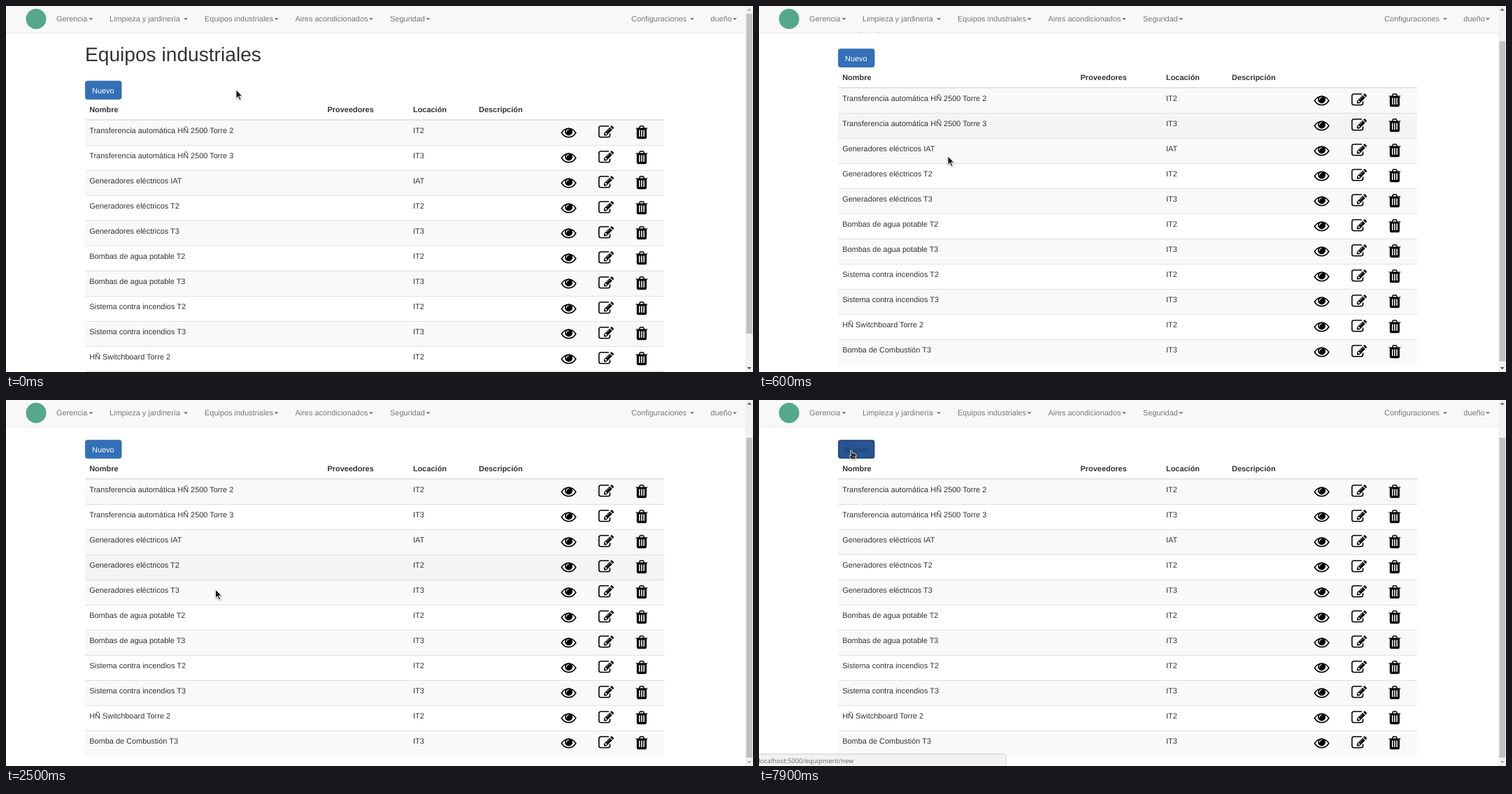
Animation, 1068 px wide and 524 px high, one loop 8000 ms. Source, as an HTML page:

```html
<!DOCTYPE html>
<html lang="es">
<head>
<meta charset="utf-8">
<title>Equipos industriales</title>
<style>
html, body { margin: 0; width: 100%; height: 100%; overflow: hidden; background: #fff; }
svg { display: block; width: 1068px; height: 524px; }
text { font: 10.95px "Liberation Sans", Arial, sans-serif; fill: #333; text-rendering: geometricPrecision; white-space: pre; }
h1, .title { font-size: 28.15px; }
.head { font-weight: bold; }
.nav text, .nav path { fill: #777; }
#status text { font: 9.38px "Open Sans", "Noto Sans", sans-serif; fill: #666; }
#button rect { fill: #3370b7; stroke: #2d67ab; }
#button text { fill: #fff; }
#button .focus { display: none; }
#button.pressed rect { fill: #285596; stroke: #1d3f70; }
#button.pressed text { fill: #22385c; }
#button.pressed .focus { display: inline; fill: none; stroke: #1c3860; stroke-dasharray: 1 1; }
.cursor { fill: #151515; stroke: #fff; stroke-width: .9; stroke-linejoin: round; filter: drop-shadow(.8px 1.2px .8px rgba(0,0,0,.35)); }
</style>
</head>
<body>
<svg viewBox="0 0 1068 524">
  <defs>
    <g id="eye">
      <path d="M64 960C230 690 540 448 896 448S1562 690 1728 960C1562 1230 1252 1472 896 1472S230 1230 64 960Z" fill="none" stroke="#000" stroke-width="128"/>
      <path fill-rule="evenodd" d="M448 832a448 448 0 0 1 896 0a448 448 0 0 1-896 0ZM592 832a48 48 0 0 0 96 0a208 208 0 0 1 208-208a48 48 0 0 0 0-96a304 304 0 0 0-304 304Z"/>
    </g>
    <g id="edit">
      <path d="M1210 210Q1165 192 1120 192H288a224 224 0 0 0-224 224v832a224 224 0 0 0 224 224h832a224 224 0 0 0 224-224V1050" fill="none" stroke="#000" stroke-width="128"/>
      <path fill-rule="evenodd" d="M1312 320l288 288-672 672H640V992ZM888 1184l116-116-152-152-116 116v56h96v96ZM1295 465L940 820q-10 40 37 27L1328 497q15-40-33-32Z"/>
      <path d="M1756 452l-92 92-288-288 92-92q68-56 136 0l152 152q56 68 0 136Z"/>
    </g>
    <g id="trash">
      <path d="M420 410L488 245Q512 192 560 192H848Q896 192 920 245L988 410" fill="none" stroke="#000" stroke-width="128"/>
      <rect y="384" width="1408" height="96" rx="32"/>
      <path fill-rule="evenodd" d="M128 440H1280V1460Q1270 1664 1120 1664H288Q138 1664 128 1460ZM384 640v768h128V640ZM640 640v768h128V640ZM896 640v768h128V640Z"/>
    </g>
  </defs>

  <g id="page">
    <text class="title" x="113" y="78.5">Equipos industriales</text>
    <g id="button">
      <rect x="113.4" y="107.4" width="51.6" height="26" rx="3" stroke-width=".8"/>
      <rect class="focus" x="114.5" y="108.5" width="49.4" height="23.8"/>
      <text x="123" y="124.6">Nuevo</text>
    </g>
    <g id="table"></g>
  </g>

  <g class="nav">
    <rect width="1057" height="38" fill="#f8f8f8"/>
    <rect y="38" width="1057" height=".8" fill="#e2e2e2"/>
    <circle cx="43" cy="18.5" r="14.5" fill="#55a88a"/>
    <g id="menu"></g>
  </g>

  <g id="scrollbar">
    <rect x="1057" width="11" height="524" fill="#f1f1f1"/>
    <rect id="thumb" x="1058.5" width="8.6" height="458" fill="#c1c1c1"/>
    <path id="up" d="M1059.7 6.6h6l-3-3.2Z"/>
    <path id="down" d="M1059.7 517h6l-3 3.2Z"/>
  </g>

  <g id="status">
    <path d="M-1 525V506.9H350.5q2.8 0 2.8 2.8V525Z" fill="#f2f2f2" stroke="#c6c6c6" stroke-width=".8"/>
    <text id="link" x="-.8" y="519.6"></text>
  </g>

  <path id="arrow" class="cursor" d="M0 0V12.3L2.8 9.7 5 14.6 7.1 13.7 4.9 8.9H8.8Z"/>
  <g id="hand" class="cursor">
    <path d="M1.5 1C1.5-.2 3.3-.3 3.6 1L4.4 4.5 5.9 4.2 7.6 4.7 9 5.2C9.9 5.7 10.1 7 9.8 9L9 12.6H3.6L.5 8.8C-.3 7.6 1.1 6.9 2.2 7.7L2.7 8.1Z"/>
    <path d="M5 7.6l.5 3M6.7 7.6l.3 3M8.3 7.6v3" stroke-width=".5"/>
  </g>
</svg>

<script>
const $ = id => document.getElementById(id);
const LOOP = 8000, STEP = 100, ROW_TOP = 163.4, ROW_H = 36;

const menu = [
  ['Gerencia', 72, 121.5], ['Limpieza y jardinería', 148, 257],
  ['Equipos industriales', 284, 386.5], ['Aires acondicionados', 413.5, 522],
  ['Seguridad', 549, 603.5], ['Configuraciones', 894, 981], ['dueño', 1007.3, 1042]
];
const heads = [['Nombre', 119.2], ['Proveedores', 459.5], ['Locación', 582], ['Descripción', 676]];
const items = [
  ['Transferencia automática HÑ 2500 Torre 2', 'IT2'],
  ['Transferencia automática HÑ 2500 Torre 3', 'IT3'],
  ['Generadores eléctricos IAT', 'IAT'],
  ['Generadores eléctricos T2', 'IT2'],
  ['Generadores eléctricos T3', 'IT3'],
  ['Bombas de agua potable T2', 'IT2'],
  ['Bombas de agua potable T3', 'IT3'],
  ['Sistema contra incendios T2', 'IT2'],
  ['Sistema contra incendios T3', 'IT3'],
  ['HÑ Switchboard Torre 2', 'IT2'],
  ['Bomba de Combustión T3', 'IT3']
];

const label = (s, x, y, cls = '') => `<text class="${cls}" x="${x}" y="${y}">${s}</text>`;
const line = (y, h) => `<rect x="113" y="${y}" width="828" height="${h}" fill="#ddd"/>`;
const icon = (id, x, y) => `<use href="#${id}" transform="translate(${x} ${y}) scale(.01228)"/>`;

$('menu').innerHTML = menu.map(([s, x, c]) =>
  label(s, x, 22) + `<path d="M${c - 3.1} 17.2h6.2l-3.1 3.1Z"/>`).join('');

$('table').innerHTML = heads.map(([s, x]) => label(s, x, 152, 'head')).join('') +
  items.map(([name, place], i) => {
    const y = ROW_TOP + i * ROW_H;
    return `<rect class="row" x="113" y="${y}" width="828" height="${ROW_H - .4}"/>` +
      (i ? line(y - .4, .9) : line(y - 1.2, 1.6)) +
      label(name, 119.2, y + 18.6) + label(place, 582, y + 18.6) +
      icon('eye', 793.5, y + 6.3) + icon('edit', 847, y + 6.3) + icon('trash', 900.2, y + 6.3);
  }).join('');
const rows = [...document.querySelectorAll('.row')];

// Pointer path: time, x, y
const path = [
  [100, 329, 120], [200, 322, 124], [300, 300, 145], [400, 272, 170], [500, 262, 178.5],
  [600, 270, 215], [700, 300, 290], [800, 340, 370], [900, 365, 422], [1000, 372, 434],
  [1100, 370, 385], [1200, 361, 310], [1300, 346, 235], [1400, 331, 175], [1500, 318, 138],
  [1700, 309, 122], [2000, 303, 130], [2200, 300, 166], [2400, 299, 240], [2500, 299.5, 271.3]
];
const scrolling = [[400, 0], [500, 26.5], [600, 46], [700, 50]];

// Later stops: time, x, y, hand cursor, hovered row, link
const base = 'localhost:5000/equipment/';
const stops = [
  [5500, 855, 126, true, 0, '3/edit'],
  [5800, 892.3, 155, false, 0, '3/edit'],
  [6300, 904.6, 126, true, 0, '3'],
  [6800, 834.5, 138, false, 0, '3'],
  [7500, 141.5, 96.5, false, -1, '3'],
  [7900, 129, 72, true, -1, 'new']
];

function sample(keys, t) {
  if (t <= keys[0][0]) return keys[0].slice(1);
  const i = keys.findIndex(k => k[0] >= t);
  if (i < 0) return keys[keys.length - 1].slice(1);
  const a = keys[i - 1], b = keys[i], p = (t - a[0]) / (b[0] - a[0]);
  return a.slice(1).map((v, j) => v + (b[j + 1] - v) * p);
}

// Hover trails the pointer by one step
function rowAt(t) {
  const [, y] = sample(path, t), [s] = sample(scrolling, t);
  return Math.floor((y + s - ROW_TOP) / ROW_H);
}

function state(t) {
  const stop = stops.filter(s => s[0] <= t).pop();
  if (stop) {
    const [, x, y, hand, hover, link] = stop;
    return { x, y, hand, hover, link };
  }
  const q = Math.min(Math.floor(t / STEP) * STEP, 2500);
  const [x, y] = sample(path, q);
  return { x, y, hand: false, hover: rowAt(q - STEP), link: '' };
}

function draw(now) {
  const t = now % LOOP, s = state(t);
  const [scroll] = sample(scrolling, Math.floor(t / STEP) * STEP);

  $('page').setAttribute('transform', `translate(0 ${-scroll})`);
  $('thumb').setAttribute('y', 11 + scroll * .86);
  $('up').setAttribute('fill', scroll > 0 ? '#505050' : '#a3a3a3');
  $('down').setAttribute('fill', scroll < 50 ? '#505050' : '#a3a3a3');
  rows.forEach((r, i) => r.setAttribute('fill', i === s.hover ? '#f4f4f4' : i % 2 ? '#fff' : '#f9f9f9'));

  $('status').style.display = s.link ? '' : 'none';
  $('link').textContent = base + s.link;
  $('button').setAttribute('class', s.link === 'new' ? 'pressed' : '');

  $('arrow').style.display = s.hand ? 'none' : '';
  $('hand').style.display = s.hand ? '' : 'none';
  $(s.hand ? 'hand' : 'arrow').setAttribute('transform', `translate(${s.x} ${s.y})`);
}

const start = performance.now();
function tick() {
  draw(performance.now() - start);
  requestAnimationFrame(tick);
}
tick();
</script>
</body>
</html>
```
